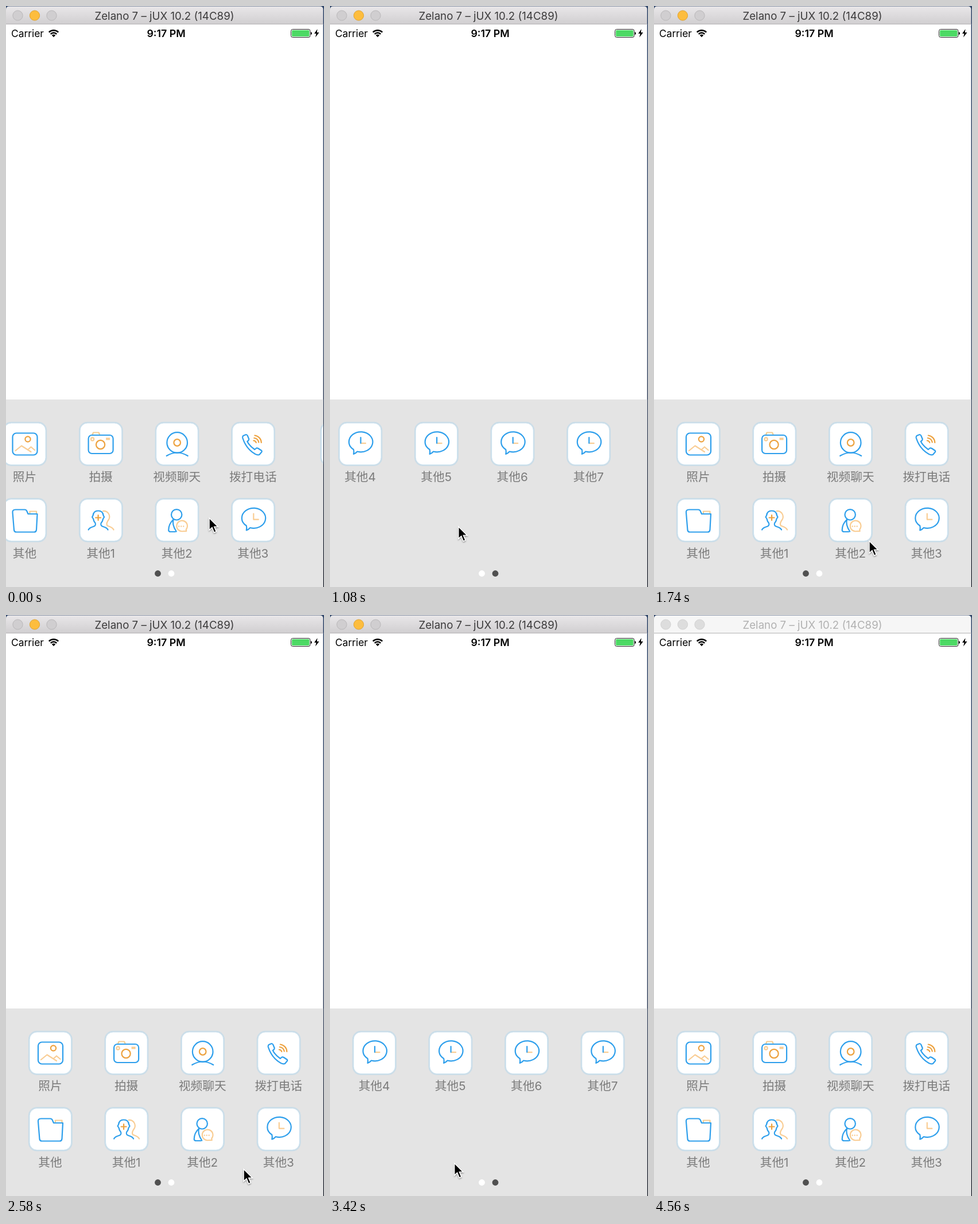
Recreate the animation shown at these times as an HTML page. Size 554 by 1010 pixels, loop 4.62 s.

```html
<!DOCTYPE html>
<html lang="zh-CN">
<head>
<meta charset="utf-8">
<style>
  html, body { margin: 0; width: 100%; height: 100%; overflow: hidden; background: #26344c; }
  svg { display: block; width: 554px; height: 1010px; }
  text { font-family: Inter, "Noto Sans CJK SC", "Noto Sans CJK", sans-serif; }
  .label { font-size: 20.7px; fill: #7b7b7b; text-anchor: middle; }
  .icon { fill: none; stroke-width: 2.2; stroke-linecap: round; stroke-linejoin: round; }
  .b { stroke: #2e9fec; }
  .o { stroke: #eda23f; }
  .l { stroke: #f9cd94; }
  .fill { fill: #f9cd94; }
  .light { stroke: #b8b6b8; fill: #d0ced0; }
  .light.min { stroke: #e0a22e; fill: #fdbd3e; }
  .inactive .light { stroke: #d0d0d0; fill: #dddddd; }
  .inactive .bar { fill: #f6f6f6; }
  .inactive .title { fill: #b1b1b1; }
  .title { font-size: 18.7px; fill: #3c3b3c; text-anchor: middle; }
</style>
</head>
<body>
<svg viewBox="0 0 554 1010">
  <defs>
    <linearGradient id="chrome" x2="0" y2="1">
      <stop stop-color="#e9e7e9"/><stop offset="1" stop-color="#d0ced0"/>
    </linearGradient>
    <linearGradient id="desk" x2="0" y2="1">
      <stop stop-color="#31476a"/><stop offset=".6" stop-color="#44536e"/><stop offset="1" stop-color="#10141f"/>
    </linearGradient>
    <clipPath id="screen"><path d="M0 684H552.5V1010H0Z"/></clipPath>
    <filter id="drop" x="-50%" y="-50%" width="200%" height="200%">
      <feDropShadow dx="0" dy="1.5" stdDeviation="1.3" flood-opacity=".4"/>
    </filter>
  </defs>
  <path fill="url(#desk)" d="M0 0H554V1010H0Z"/>
  <path fill="#fff" d="M0 31H552.5V1010H0Z"/>
  <g id="window">
    <path class="bar" fill="url(#chrome)" d="M0 32V6Q0 .5 6 .5H546.5Q552.5 .5 552.5 6V32Z"/>
    <path fill="#b4b2b4" d="M0 31H552.5V32H0Z"/>
    <circle class="light" cx="20.5" cy="16.5" r="8.6"/>
    <circle class="light min" cx="50" cy="16.5" r="8.6"/>
    <circle class="light" cx="79.5" cy="16.5" r="8.6"/>
    <text class="title" x="276" y="23.5">Zelano 7 – jUX 10.2 (14C89)</text>
  </g>
  <text x="9" y="54" font-size="17.4">Carrier</text>
  <text x="279" y="54" font-size="17.8" font-weight="600" text-anchor="middle">9:17 PM</text>
  <g fill="none" stroke="#000" stroke-width="2.5">
    <path d="M74.8 45.6A11.8 11.8 0 0 1 91.2 45.6M77.8 48.8A7.3 7.3 0 0 1 88.2 48.8"/>
    <path fill="#000" stroke="none" d="M79.8 50.8A4.6 4.6 0 0 1 86.2 50.8L83 54.2Z"/>
  </g>
  <rect x="496.5" y="40.5" width="33.5" height="14" rx="3" fill="#fff" stroke="#222"/>
  <rect x="498" y="42" width="30.5" height="11" rx="1.6" fill="#4cd964"/>
  <path d="M531 45Q533 45.5 533 47.5Q533 49.5 531 50ZM542.5 40L537 48H540.5L539 54.5L545.5 46H541.7Z"/>
  <g clip-path="url(#screen)">
    <path fill="#e4e4e4" d="M0 684H553V1010H0Z"/>
    <g id="pages"></g>
    <circle class="dot" cx="264.5" cy="986.5" r="5.4"/>
    <circle class="dot" cx="288" cy="986.5" r="5.4"/>
  </g>
  <path id="cursor" filter="url(#drop)" stroke="#fff" stroke-width="1.5"
    d="M0 0V21L5 16.5L8.5 25.3L12.3 23.6L8.7 15.2H15.3Z"/>
</svg>
<script>
const LOOP = 4620, STEP = 60, PAGE = 553;
const $ = id => document.getElementById(id);
const path = (cls, d) => `<path class="${cls}" d="${d}"/>`;
const ring = (cls, x, y, r) => `<circle class="${cls}" cx="${x}" cy="${y}" r="${r}"/>`;
const box = (cls, x, y, w, h, r) => `<rect class="${cls}" x="${x}" y="${y}" width="${w}" height="${h}" rx="${r}"/>`;
const chat = hand =>
  path('b', 'M24.5 46Q16.5 41 16.5 33A20.7 17.5 0 1 1 31 49.5Q28 53 24.5 54Q25.5 50 24.5 46Z') +
  path('l', 'M37.5 35.2H45.5') + path(hand, 'M37 25V35');

const icons = {
  照片: box('b', 15, 17.5, 43, 38, 6.5) + ring('o', 41.5, 28, 4.6) +
    path('l', 'M20 48L30.5 39.5L47 50M42 46L47 41.5L53.5 47'),
  拍摄: path('l', 'M21.5 20L23 16.5H32.5L34 20') + box('b', 14.5, 21, 43, 32, 6) +
    ring('o', 35.5, 37.5, 7.6) + ring('l', 21.5, 28, 2.6) + box('fill', 45, 25.5, 7, 4, 0),
  视频聊天: ring('b', 36.5, 34, 17.8) + ring('o', 36.5, 34, 5.8) + path('b', 'M18 57Q36.5 46 55 57'),
  拨打电话: path('b', 'M19 22L24 20Q25.5 20 26.5 22L29 28Q29 30 26 32Q30 40 39 46L42 43.5Q43 43 45 44L51 48Q52 49.5 50.5 51L47 55Q44 56 40 54Q24 45 18 26Q17.5 23.5 19 22Z') +
    path('o', 'M39 21.5A13 13 0 0 1 50.5 34M38 26A9 9 0 0 1 46 33.5M37 30.5A5 5 0 0 1 41.5 34'),
  其他: path('l', 'M45 24.5V21H56.5V25') +
    path('b', 'M20 18H36Q39 18 40 21L42 25.5H58L56.5 53Q56 57 52.5 57H21.5Q18 57 17.5 53.5L15 23Q14.5 18 20 18Z'),
  其他1: path('l', 'M40 20.5Q45 19.5 49 24Q53 30 50 35Q44.5 42 47.5 46Q57 49 58.5 53') +
    path('b', 'M14.5 53Q16 49.5 23 47.5Q28 46 26.5 41.5Q23.5 38 23 34L21 31L22.5 28Q23.5 20 31.5 20Q39.5 20 40.5 28L42 31L40 34Q39.5 38 36.5 41.5Q35 46 40 47.5Q47 49.5 48.5 53') +
    path('o', 'M31.5 27.5V36.5M27 32H36'),
  其他2: ring('b', 35.5, 26.8, 9.2) + path('b', 'M30 35Q21.5 43 21.5 54Q22 56.5 25 56.5H33M30 35Q27 44 35 56') +
    path('l', 'M52 52.5A9.3 9.3 0 1 0 47 55.5H52.5Z') +
    [39.5, 43.5, 47.5].map(x => ring('fill', x, 47, 1.2)).join(''),
  其他3: chat('l')
};
for (const n of [4, 5, 6, 7]) icons['其他' + n] = chat('b');

$('pages').innerHTML = Object.entries(icons).map(([name, icon], i) => {
  const x = 41 + i % 4 * 132.6 + (i > 7 ? PAGE : 0), y = i > 3 && i < 8 ? 857.5 : 725;
  return `<g transform="translate(${x} ${y})">
    <rect x="-1.2" y="-1.2" width="75" height="75" rx="14" fill="none" stroke="#cbdde8" stroke-width="2"/>
    <rect width="72.6" height="72.6" rx="13" fill="#fff" stroke="#bfdcee" stroke-width=".8"/>
    <g class="icon">${icon}</g><text class="label" x="36" y="101">${name}</text></g>`;
}).join('');

// Points are [time, value, ease-out power].
const scroll = [[0, 44.5], [60, 105], [120, 190], [420, 552, 3], [480, PAGE], [660, PAGE], [900, 612, 2],
  [1080, 577.5], [1200, PAGE, 2], [1320, PAGE], [1500, 390], [1740, 0, 3], [1980, 0], [2220, -56, 2],
  [2460, 0, 3], [2820, 0], [3000, 133.5], [3060, 200], [3420, PAGE, 3], [3660, PAGE], [3840, 348],
  [3900, 270], [4260, 0, 3]];
const mouseX = [[0, 354], [120, 262], [180, 240], [420, 348, 2], [660, 348], [900, 225, 2], [1320, 222],
  [1500, 375], [1980, 375], [2220, 470, 2], [2460, 440], [2820, 362], [3000, 231], [3120, 170],
  [3660, 254], [3840, 459], [3960, 500, 2], [4440, 510]];
const mouseY = [[0, 890], [420, 902], [1080, 905], [1740, 930], [2220, 985], [2460, 980], [2820, 930],
  [3000, 921], [3300, 935], [3600, 980], [3840, 968], [4320, 990], [4440, 1014]];

function at(track, t) {
  const i = track.findIndex(p => p[0] > t);
  if (i < 0) return track.at(-1)[1];
  const [t0, v0] = track[i - 1], [t1, v1, power = 1] = track[i];
  return v0 + (v1 - v0) * (1 - (1 - (t - t0) / (t1 - t0)) ** power);
}

const dots = document.querySelectorAll('.dot');
function draw(now) {
  const t = Math.floor(now % LOOP / STEP) * STEP, offset = at(scroll, t);
  $('pages').setAttribute('transform', `translate(${-offset} 0)`);
  $('cursor').setAttribute('transform', `translate(${at(mouseX, t)} ${at(mouseY, t)})`);
  $('window').classList.toggle('inactive', t >= 4440);
  dots.forEach((dot, i) => dot.setAttribute('fill', i === +(offset > PAGE / 2) ? '#505050' : '#fff'));
}

const start = performance.now();
function tick() {
  draw(performance.now() - start);
  requestAnimationFrame(tick);
}
tick();
</script>
</body>
</html>
```
